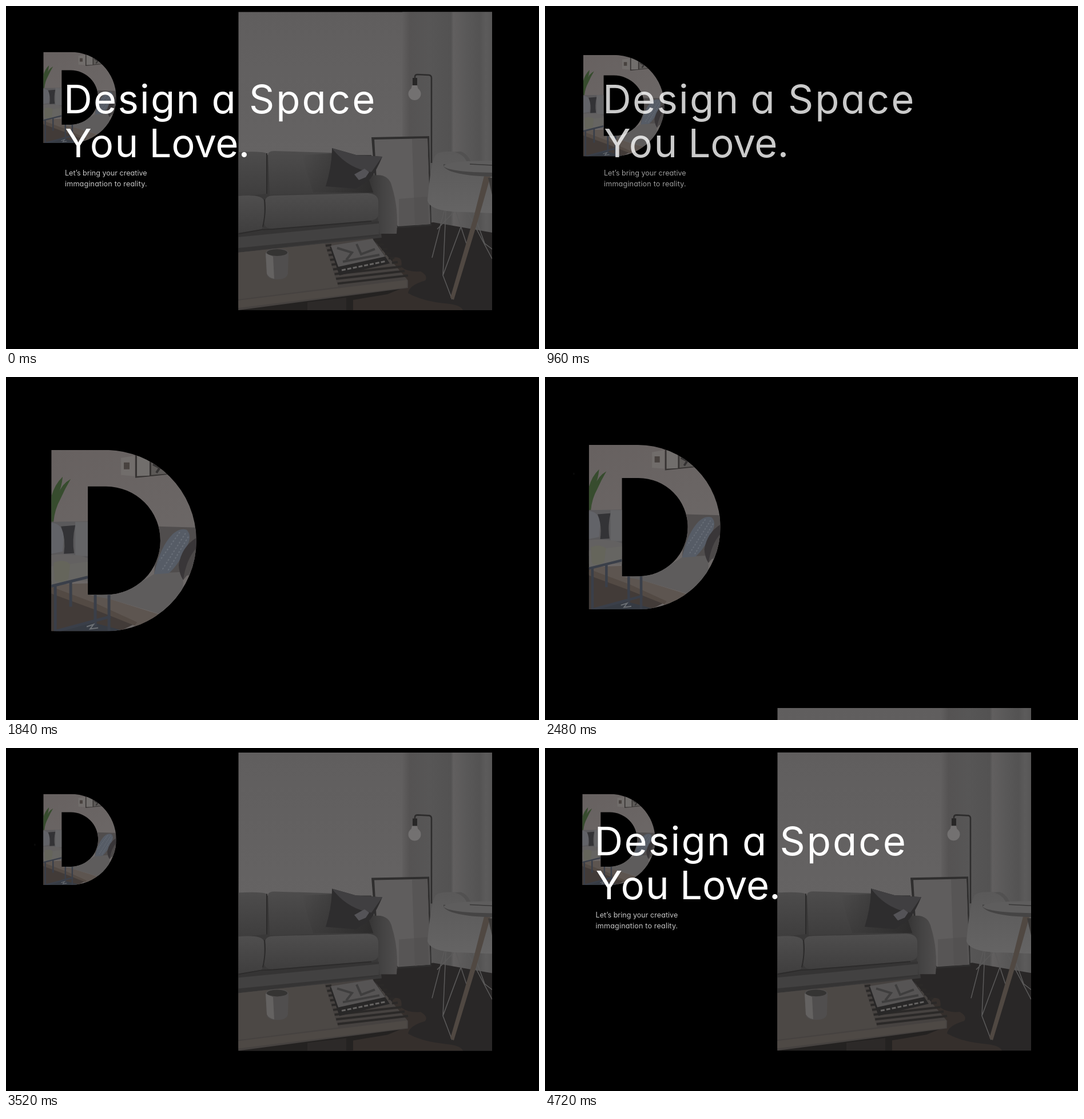
Recreate the animation shown at these times as an HTML page. Size 932 px wide and 601 px high, loop 4.8 s.

```html
<!DOCTYPE html>
<html lang="en">
<head>
<meta charset="utf-8">
<title>Design a Space You Love</title>
<style>
  html, body { margin: 0; width: 100%; height: 100%; overflow: hidden; background: #000; }
  svg { display: block; width: 932px; height: 601px; }
  text { font-family: Inter, "Open Sans", sans-serif; font-feature-settings: "cv11"; fill: #fff; }
  .head { font-size: 69px; }
  .sub { font-size: 12.6px; fill: #c6c6c6; }
  .line { fill: none; }
</style>
</head>
<body>
<svg viewBox="0 0 932 601">
  <defs>
    <clipPath id="room"><path d="M-.5 -.5H443V522H-.5z"/></clipPath>
    <clipPath id="letter">
      <path clip-rule="evenodd" d="M0 0H95A159 159 0 0 1 95 318H0zM64 64V254H96A95 95 0 0 0 96 64z"/>
    </clipPath>
    <clipPath id="reveal"><path d="M50 100H932V400H50z"/></clipPath>
    <linearGradient id="wall" x2="0" y2="1">
      <stop offset="0" stop-color="#605e5e"/><stop offset=".5" stop-color="#656363"/>
    </linearGradient>
    <linearGradient id="curtain">
      <stop offset="0" stop-color="#605e5e"/><stop offset=".08" stop-color="#555353"/>
      <stop offset=".3" stop-color="#575656"/><stop offset=".54" stop-color="#535252"/>
      <stop offset=".57" stop-color="#615f5f"/><stop offset=".72" stop-color="#595858"/>
      <stop offset=".86" stop-color="#545353"/><stop offset=".93" stop-color="#5c5b5b"/>
      <stop offset="1" stop-color="#575656"/>
    </linearGradient>
    <linearGradient id="back" x2="0" y2="1">
      <stop offset="0" stop-color="#4d4c4c"/><stop offset="1" stop-color="#3e3d3d"/>
    </linearGradient>
    <linearGradient id="seat" x2="0" y2="1">
      <stop offset="0" stop-color="#4f4e4e"/><stop offset="1" stop-color="#3f3e3e"/>
    </linearGradient>
    <linearGradient id="arm">
      <stop offset="0" stop-color="#353434"/><stop offset=".5" stop-color="#444343"/><stop offset="1" stop-color="#4f4d4d"/>
    </linearGradient>
    <linearGradient id="shade">
      <stop offset="0" stop-color="#2c2b2b" stop-opacity="0"/><stop offset="1" stop-color="#2c2b2b"/>
    </linearGradient>
    <linearGradient id="shell" x2="0" y2="1">
      <stop offset="0" stop-color="#5a5959"/><stop offset="1" stop-color="#656464"/>
    </linearGradient>
    <linearGradient id="warm" x2=".4" y2="1">
      <stop offset="0" stop-color="#676160"/><stop offset="1" stop-color="#6d6968"/>
    </linearGradient>
  </defs>

  <g id="photo"><g clip-path="url(#room)">
    <path fill="url(#wall)" d="M-1 -1H443V522H-1z"/>
    <path fill="url(#curtain)" d="M286 -1H443V400H286z"/>
    <path fill="#292727" d="M230 384L340 368L443 386V522H150z"/>
    <!-- mirror -->
    <path fill="#2f2e2e" d="M232 219L333 217L337 374L278 378L240 320z"/>
    <path fill="#5f5d5d" d="M237 223L330 221L335 371L278 375L242 310z"/>
    <path fill="#575555" d="M303 222L330 221L335 371L308 373z"/>
    <path fill="#504f4f" d="M280 327L330 323L332 371L280 374z" opacity=".5"/>
    <!-- lamp -->
    <path class="line" stroke="#2d2c2c" stroke-width="2.600" d="M308 117V113Q308 109 313 109L333 110Q337 111 337 115V264"/>
    <path fill="#282727" d="M304 115H312V129H304z"/>
    <circle cx="307.500" cy="143" r="11" fill="#737171"/>
    <path fill="#737171" d="M303 128H312L314 136H301z"/>
    <!-- sofa -->
    <path fill="#393838" d="M0 250H232L250 395L0 422z"/>
    <path fill="url(#back)" d="M-1 245Q40 243 48 247V318L-1 323z"/>
    <path fill="url(#back)" d="M51 249Q52 243 62 243L160 246L225 254L238 316L54 320z"/>
    <path fill="url(#shade)" d="M110 250L190 246L238 300V316H130z"/>
    <path fill="url(#arm)" d="M226 288Q262 278 268 306Q280 345 276 388H246L240 330z"/>
    <path fill="#353434" d="M-1 386L245 366V391L-1 421z"/>
    <path fill="#424141" d="M-1 394L245 370V389L-1 413z"/>
    <path fill="url(#seat)" d="M-1 322Q40 318 44 330Q46 370 40 380L-1 387z"/>
    <path fill="url(#seat)" d="M46 330Q48 321 62 321L225 317Q244 318 244 332V354Q244 363 230 365L60 379Q42 380 44 362z"/>
    <path class="line" stroke="#2c2b2b" stroke-width="2" d="M49 247V318M0 388L40 381L60 380L232 366M45 328Q48 350 42 376"/>
    <!-- cushion -->
    <path fill="#2e2d2e" d="M163 238L205 250L251 253Q242 275 230 292L205 309L152 305Q163 270 163 238z"/>
    <path fill="#403f41" d="M163 238L205 250L251 253L232 280Q190 274 163 238z"/>
    <path fill="#545357" d="M202 284L220 274L228 280L222 289L210 294z"/>
    <!-- chair and round table -->
    <path class="line" stroke="#5b5a5a" stroke-width="1.500" d="M360 345L338 430M362 348L357 461L373 503M398 350L357 461M380 350L398 405M400 350L443 432M376 350L347 380M410 350L430 405L443 415"/>
    <path fill="url(#shell)" d="M330 330Q336 262 344 250Q350 244 365 244H388Q402 248 408 268L443 280V352L395 350Q335 350 330 330z"/>
    <path fill="#525151" d="M388 244Q402 248 408 268L400 266Q396 250 378 245z"/>
    <path fill="#504842" d="M429 287L440 288L419 362L376 504L370 500L410 362z"/>
    <path fill="#3c3a39" d="M436 290H443V320z"/>
    <path fill="#454444" d="M358 270Q370 286 443 288V278L358 266z"/>
    <path fill="#5e5d5d" d="M358 270Q362 260 443 260V281Q370 280 358 270z"/>
    <path class="line" stroke="#383737" stroke-width="1.500" d="M404 266L443 268"/>
    <!-- hide rug -->
    <path fill="#352f2c" d="M270 430Q288 426 284 446Q296 456 318 454Q332 462 326 470Q298 478 296 492Q320 506 360 510Q388 512 392 522H150L260 470z"/>
    <!-- coffee table -->
    <path fill="#242221" d="M0 512L294 480L260 494L200 504V522H-1z"/>
    <path fill="#464240" d="M-1 421L234 396L296 470V483L-1 522z"/>
    <path fill="#4c4845" d="M-1 421L150 405L174 481L-1 503z"/>
    <path fill="#4e4945" d="M-1 505L294 469V482L-1 518z"/>
    <path fill="#2c2928" d="M120 508L188 500V522H120z"/>
    <g id="slats" stroke="#2b2928" stroke-width="4"></g>
    <path fill="#282727" d="M159 411L236 398L264 440L176 461z"/>
    <path fill="#565454" d="M161 409L234 397L256 428L174 446z"/>
    <path class="line" stroke="#3f3e3e" stroke-width="4" d="M172 413L198 421L188 434M206 406L214 424L238 415M182 437L246 425"/>
    <path class="line" stroke="#656362" stroke-width="3" stroke-dasharray="7 3" d="M180 452L258 436"/>
    <!-- cup -->
    <path fill="#504e4e" d="M47 422Q48 414 67 414T87 422L86 458Q84 468 67 468T49 458z"/>
    <path fill="#646261" d="M47 422L49 458Q52 465 62 467L60 428z"/>
    <ellipse cx="67" cy="421" rx="18" ry="6" fill="#353433"/>
  </g></g>

  <g id="mark"><g clip-path="url(#letter)">
    <path fill="url(#warm)" d="M0 0H254V318H0z"/>
    <path fill="#716d6b" d="M122 14L146 10V46L122 44z"/>
    <path fill="#48423f" d="M127 22H137V34H127z"/>
    <path fill="#363332" d="M147 6H215V42L147 49z"/>
    <path fill="#716e6c" d="M150 6H172V45L150 46z"/>
    <path fill="#5c5957" d="M175 20H210V41L175 44z"/>
    <path class="line" stroke="#343232" stroke-width="4" d="M178 25L190 31L184 40M194 29L202 39"/>
    <!-- plant -->
    <path fill="#374c2e" d="M0 82Q6 60 20 47Q18 66 12 78Q18 60 34 51Q24 68 16 86Q6 104 4 126H0z"/>
    <!-- sofa -->
    <path fill="#5a595b" d="M0 126L64 125V215H0z"/>
    <path fill="#626368" d="M0 128Q18 128 22 150L20 178L0 182z"/>
    <path fill="#333336" d="M17 134L42 132Q36 158 40 181L22 182Q26 156 17 134z"/>
    <path fill="#646466" d="M42 126H64V186H42z"/>
    <path fill="#636161" d="M0 184Q40 180 64 190V230H0z"/>
    <path fill="#504d4d" d="M186 134L254 136V220H180z"/>
    <path fill="#5e5c5c" d="M60 258L100 253Q140 245 182 216L228 214Q236 238 222 270L188 287L104 262z"/>
    <path fill="#565c66" d="M237 140Q247 150 238 168Q224 200 206 216L180 218Q190 170 213 147Q226 136 237 140z"/>
    <path class="line" stroke="#696f78" stroke-width="2" stroke-dasharray="3 3" d="M235 146L193 212M240 152L204 212M225 144L190 194"/>
    <path fill="#393638" d="M254 154Q228 170 223 202Q224 218 231 228L254 190z"/>
    <path fill="#4b4848" d="M254 172Q236 192 231 228L254 200z"/>
    <!-- floor and side table -->
    <path fill="#5d5550" d="M0 236L64 234V254L104 262L188 288L154 312L84 280L0 250z"/>
    <path fill="#423b38" d="M0 246L60 268L150 303L120 318H0z"/>
    <path fill="#534a44" d="M0 240L80 270L150 302L146 308L76 280L0 252z"/>
    <path fill="#363b43" d="M12 318L70 302L130 318z"/>
    <path fill="#666562" d="M0 204L64 196V223L0 238z"/>
    <path fill="#65655b" d="M4 198Q20 190 33 200L30 226Q16 236 6 228z"/>
    <path class="line" stroke="#3a3f49" stroke-width="5" d="M0 239L64 223M7 238V318M34 232V275M77 254V310M101 254V318M8 318L104 292"/>
    <path class="line" stroke="#6c7075" stroke-width="2" d="M62 310L74 306L68 314L82 312"/>
  </g></g>

  <g clip-path="url(#reveal)">
    <g id="copy">
      <g class="head">
        <text x="101" y="187.500" letter-spacing="2.200">Design</text>
        <text x="359.500" y="187.500">a</text>
        <text x="425" y="187.500" letter-spacing="3">Space</text>
        <text x="103" y="264.500" letter-spacing="2.300">You</text>
        <text x="250.500" y="264.500" letter-spacing="-.2">Love.</text>
      </g>
      <text class="sub" x="103" y="297">Let’s bring your creative</text>
      <text class="sub" x="103" y="315.500" letter-spacing=".17">immagination to reality.</text>
    </g>
  </g>
</svg>
<script>
  const LOOP = 4800, STEP = 80;
  const $ = id => document.getElementById(id);
  const photo = $("photo"), mark = $("mark"), copy = $("copy");

  const lerp = (a, b, k) => a + (b - a) * k;
  // Cubic ease in and out between two times.
  const ease = (t, from, to) => {
    const u = Math.min(1, Math.max(0, (t - from) / (to - from)));
    return u < .5 ? 4 * u ** 3 : 1 - 4 * (1 - u) ** 3;
  };

  function addSlats() {
    let d = "";
    for (let i = 0; i < 9; i++) {
      const x = 152 + i * 2.6, y = 409 + i * 8.3;
      const right = 238 + i * 6, rise = y - 9 - i * .5;
      d += `M${x} ${y}l10 -1.2M${right} ${rise}l10 -1.2`;
      if (i > 5) d += `M${x} ${y}L${right} ${rise}`;
    }
    $("slats").innerHTML = `<path d="${d}"/>`;
  }

  function draw(t) {
    const leaving = t < 1560 || t >= 4645;
    const away = leaving
      ? ease(t < 1560 ? t + LOOP : t, 4645, 6285)
      : 1 - ease(t, 1571, 3617);
    photo.setAttribute("transform", `translate(407 ${lerp(8, 890, away).toFixed(2)})`);

    const grow = ease(t, 520, 1960) - ease(t, 1960, 3400);
    const x = lerp(65.2, 79.2, grow), y = lerp(80.4, 128, grow);
    mark.setAttribute("transform", `translate(${x} ${y}) scale(${lerp(.502, 1, grow)})`);

    const sliding = t >= 2400;
    const dx = sliding ? lerp(-592, 0, ease(t, 3543, 4983)) : 0;
    const alpha = sliding ? 1 : 1 - ease(t, 520, 1700);
    copy.setAttribute("transform", `translate(${dx.toFixed(2)} 0)`);
    copy.setAttribute("opacity", alpha);
  }

  const start = performance.now();
  function tick() {
    const t = (performance.now() - start) % LOOP;
    draw(Math.floor(t / STEP) * STEP);
    requestAnimationFrame(tick);
  }

  addSlats();
  draw(0);
  requestAnimationFrame(tick);
</script>
</body>
</html>
```
